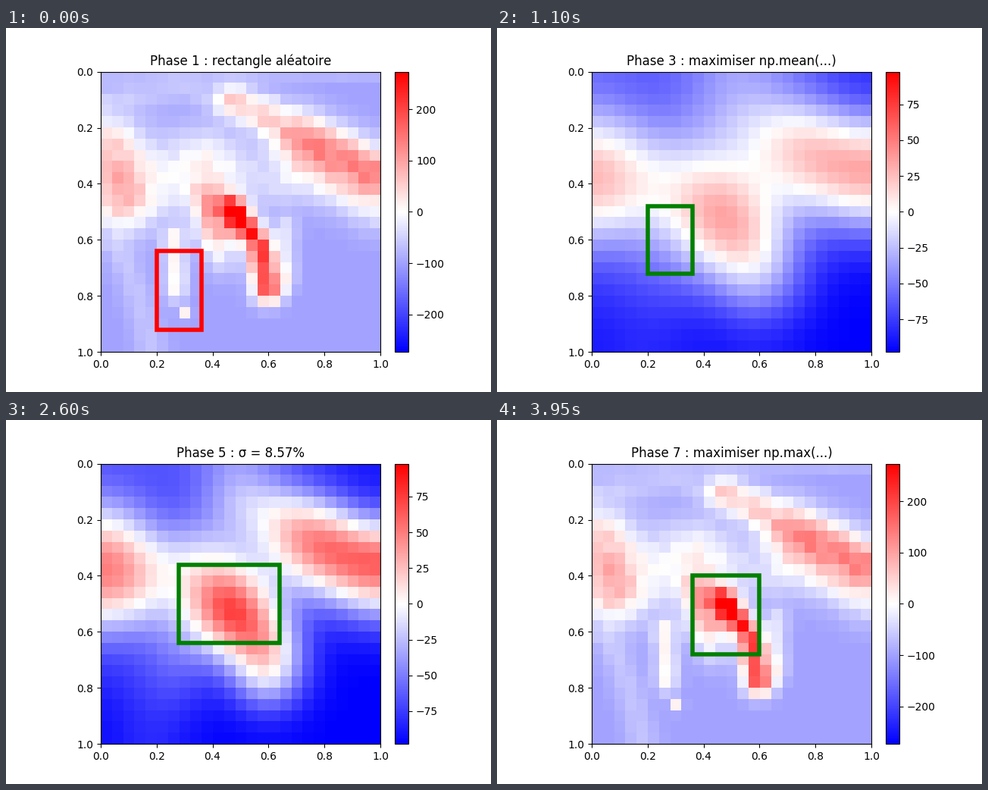
Animation of 640 by 480 pixels, one loop 4.05 s. Source, as a matplotlib script:

```python
import numpy as np
import matplotlib.pyplot as plt
from matplotlib.animation import FuncAnimation
from matplotlib.patches import Rectangle
from mpl_toolkits.axes_grid1 import make_axes_locatable

plt.rcParams["text.kerning_factor"] = 6

N = 25
FLOOR, PEAK = -98, 273
MAX_SIGMA = 0.12
STEPS = 7

# Key points of each crest line (in cells), its spread and its height
RIDGES = [
    ([(3.5, 9), (8, 9)], 2.7, 80),                    # central plateau
    ([(9, 7), (15, 9.5)], 1.8, 45),                   # saddle
    ([(0, 6), (1.2, 11)], 1.9, 130),                  # west massif
    ([(11.5, 2.2), (14, 3.3)], 1.15, 140),            # north spur
    ([(17, 5.2), (24, 8.5)], 1.6, 205),               # east crest
    ([(18, 8.5), (24, 11.5)], 1.6, 75),               # east foothills
    ([(9.3, 11), (9.8, 14)], 1.1, 160),               # shoulder
    ([(11.3, 11.8), (13.6, 15), (14.4, 19)], .85, 310),   # main crest
    ([(12, 13)], .7, 100),                            # summit
    ([(16, 13.5), (16, 18)], .7, 70),
    ([(10.3, 16.5)], 1, 55),
    ([(6, 14.5), (6.2, 19)], .7, 110),
    ([(7, 21)], .4, 120),
    ([(1, 15), (3, 20), (4, 24)], 1, 35),
    ([(0, 2), (7, 1), (10, 2)], .9, 35),
    ([(0, 0), (24, 0)], .4, 18),
]


def distance(x, y, p, q):
    """Distance from every cell to the segment p-q."""
    dx, dy = q[0] - p[0], q[1] - p[1]
    t = ((x - p[0]) * dx + (y - p[1]) * dy) / (dx * dx + dy * dy or 1)
    t = np.clip(t, 0, 1)
    return np.hypot(x - p[0] - t * dx, y - p[1] - t * dy)


def relief():
    y, x = np.mgrid[:N, :N]
    z = np.zeros((N, N))
    for points, spread, height in RIDGES:
        ends = points[1:] or points
        d = np.min([distance(x, y, p, q) for p, q in zip(points, ends)], axis=0)
        z += height * np.exp(-(d / spread) ** 2 / 2)
    z *= np.random.default_rng(4).uniform(0.9, 1.1, z.shape)
    return np.clip(z + FLOOR, FLOOR, PEAK)


def blur(z, sigma):
    """Gaussian blur, sigma as a fraction of the width."""
    s = sigma * N
    if s == 0:
        return z
    pad = int(4 * s + 0.5)
    kernel = np.exp(-0.5 * (np.arange(-pad, pad + 1) / s) ** 2)
    kernel /= kernel.sum()
    for axis in (0, 1):
        z = np.apply_along_axis(
            lambda v: np.convolve(np.pad(v, pad, mode="symmetric"), kernel, "valid"),
            axis, z)
    return z


def climb(path, z, score):
    """Move one edge by one cell at a time, best score first."""
    box = path[0]
    boxes = [box]
    for goal in path[1:]:
        while box != goal:
            options = []
            for k in range(4):
                step = int(np.sign(goal[k] - box[k]))
                if step:
                    l, r, t, b = new = box[:k] + (box[k] + step,) + box[k + 1:]
                    if r - l >= 2 and b - t >= 2:
                        options.append(new)
            box = max(options, key=lambda o: score(z[o[2]:o[3], o[0]:o[1]]))
            boxes.append(box)
    return boxes


# Boxes: left, right, top, bottom
START = (5, 9, 16, 23)
WARM = (11, 13, 12, 14)
WIDE = (7, 16, 9, 16)
HOT = (12, 14, 13, 15)
FINAL = (9, 15, 10, 17)

sharp = relief()
soft = blur(sharp, MAX_SIGMA)
scenes = []


def add(phase, text, z, box, color="green"):
    scenes.append((f"Phase {phase} : {text}", z, box, color))


def add_climb(phase, name, path, z, score):
    for box in climb(path, z, score):
        add(phase, f"maximiser np.{name}(...)", z, box)


def add_blur(phase, steps, box):
    for i in steps:
        s = MAX_SIGMA * i / STEPS
        add(phase, f"σ = {100 * s:.2f}%", blur(sharp, s), box)


for i in range(6):
    add(1, "rectangle aléatoire", sharp, START, "green" if i % 2 else "red")
add_blur(2, range(STEPS), START)
add_climb(3, "mean", [START, (8, 12, 12, 15), WARM], soft, np.mean)
add_climb(4, "max", [WARM, WIDE], soft, np.sum)
add_blur(5, range(STEPS, 0, -1), WIDE)
add_climb(6, "mean", [WIDE, (8, 16, 10, 16), HOT], sharp, np.mean)
add_climb(7, "max", [HOT, FINAL], sharp, np.sum)
scenes.append(scenes[-1])

fig, ax = plt.subplots(figsize=(6.4, 4.8), dpi=100)
image = ax.imshow(sharp, cmap="bwr", extent=(0, 1, 1, 0), vmin=-PEAK, vmax=PEAK)
cax = make_axes_locatable(ax).append_axes("right", size="5%", pad="5%")
fig.colorbar(image, cax=cax)
frame = ax.add_patch(Rectangle((0, 0), 1, 1, fill=False, linewidth=4))
title = ax.set_title("")


def draw(i):
    text, z, (l, r, t, b), color = scenes[i]
    top = np.abs(z).max()
    image.set_data(z)
    image.set_clim(-top, top)
    frame.set_bounds(l / N, t / N, (r - l) / N, (b - t) / N)
    frame.set_edgecolor(color)
    title.set_text(text)
    return image, frame, title


anim = FuncAnimation(fig, draw, frames=len(scenes), interval=50, repeat=True)
plt.show()
```
